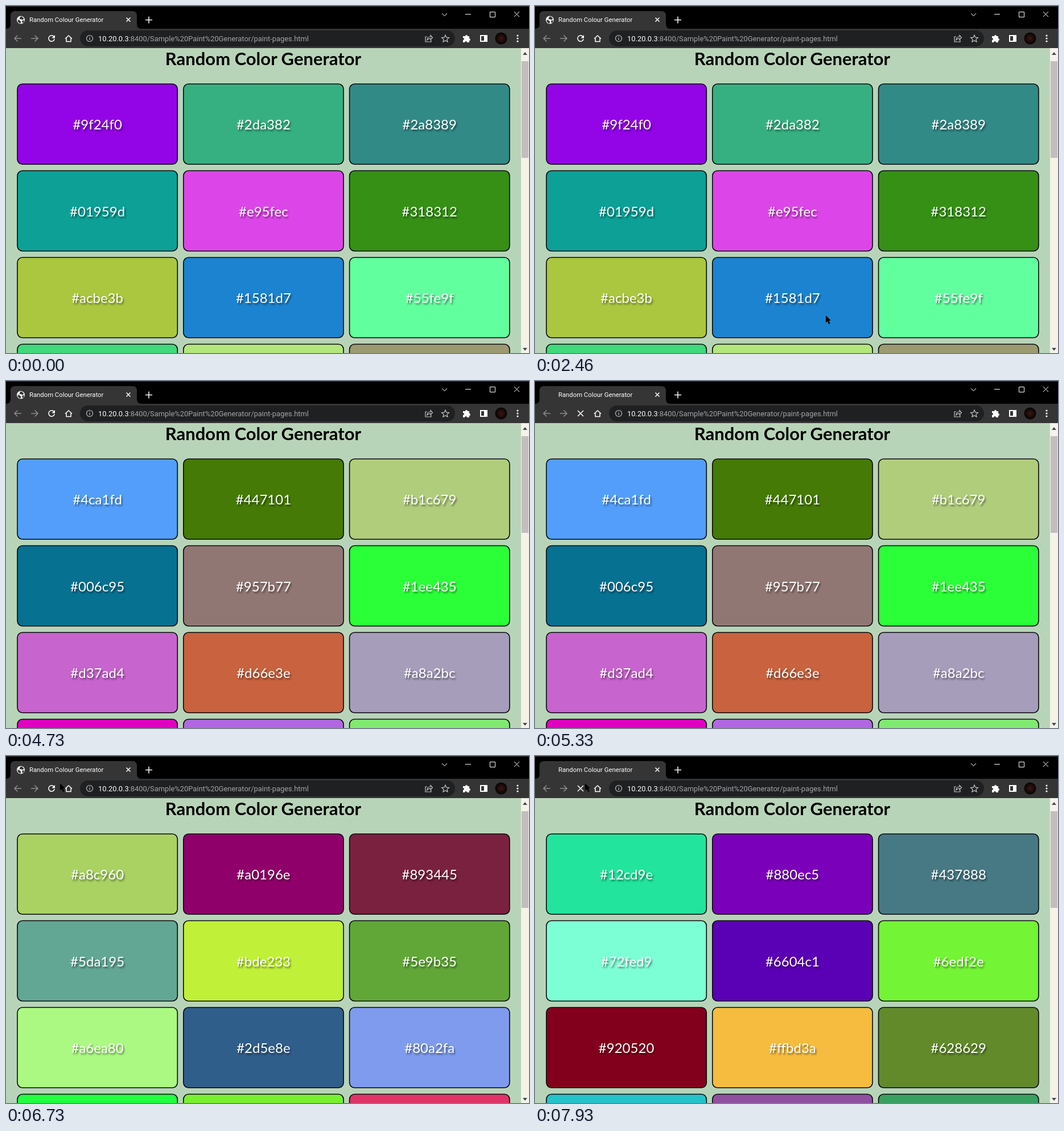
Write an HTML page that moves like this. It is 919x610 px and loops after 8000 ms.

```html
<!DOCTYPE html>
<html lang="en">
<head>
<meta charset="utf-8">
<title>Random Colour Generator</title>
<style>
  html, body { margin: 0; width: 100%; height: 100%; overflow: hidden; background: #000; }
  svg { display: block; width: 919px; height: 610px; }
  .ui { font-family: Roboto, sans-serif; fill: #fff; }
  .line { fill: none; stroke: #fff; stroke-width: 1.5; }
  .thin { fill: none; stroke: #fff; stroke-width: 1; }
  .dim { stroke: #8c8c8c; }
  .soft { stroke: #c4c4c4; stroke-width: 1.2; }
  .page { font-family: Lato, sans-serif; text-anchor: middle; }
  .title { font-size: 31px; font-weight: 700; }
  .code { font-size: 24px; fill: #fff; text-shadow: 2px 3px 3px rgba(0, 0, 0, .45); }
  .card { stroke: #08080c; stroke-width: 1.6; }
</style>
</head>
<body>
<svg viewBox="0 0 919 610">
  <defs>
    <radialGradient id="avatar">
      <stop offset="0" stop-color="#3c1710"/>
      <stop offset="1" stop-color="#060304"/>
    </radialGradient>
  </defs>

  <!-- page -->
  <rect y="74" width="905" height="536" fill="#b8d4b8"/>
  <text class="page title" x="452" y="104">Random Color Generator</text>
  <g id="cards"></g>
  <rect x="905" y="74" width="14" height="536" fill="#f5f2e8"/>
  <rect x="906" y="97" width="12" height="170" fill="#c2bebc"/>
  <path d="M908 86l4-5 4 5zM908 601h8l-4 5z" fill="#4a4a4a"/>

  <!-- tab strip -->
  <rect width="919" height="74" fill="#000"/>
  <path d="M0 .5H919" stroke="#3a3a40"/>
  <path d="M0 40q8 0 8-8V17q0-8 8-8H222q8 0 8 8V32q0 8 8 8H919V74H0z" fill="#353535"/>
  <g id="globe">
    <circle cx="26" cy="24.500" r="7" fill="#f4f4f4"/>
    <path d="M20.500 24l4 1.500 2 2.500-1.500 3-4-3zM25 19l3-.5 3.500 4-3 2-2-1.500-3 .5zM28 26l4-1-1 4-2 1z" fill="#353535"/>
  </g>
  <text class="ui" x="41" y="28" font-size="11.3">Random Colour Generator</text>
  <path class="line" d="M211.500 20.500l7 7m0-7l-7 7M245 24.500h12m-6-6v12"/>
  <path class="thin" d="M766 13l4.500 4.500 4.500-4.500M807 14.500h10M850.500 10.500h9v9h-9zM893 10l9 9m0-9l-9 9"/>

  <!-- toolbar -->
  <rect x="130" y="43" width="659" height="28" rx="14" fill="#1f2022"/>
  <path class="line dim" d="M27 57H15m5.500-5.500L15 57l5.500 5.500M44 57h12m-5.500-5.500L56 57l-5.500 5.500"/>
  <g id="reload">
    <path class="line" stroke-width="1.8" d="M84 53.500a5.200 5.200 0 1 0 1.200 4.500"/>
    <path d="M86 51v5.500h-5.500z" fill="#fff"/>
  </g>
  <path id="stop" class="line" d="M75 52l10 10m0-10L75 62"/>
  <path class="line" d="M104 57.500l6-5.500 6 5.500M106 56.500v6h8v-6"/>
  <g class="soft" fill="none">
    <circle cx="147" cy="57" r="5.500"/>
    <path d="M147 56v4m0-6.500v1.300"/>
    <path d="M740 54h-3v9h10v-3M740 60q0-6 6-6v-2.500l3.500 4-3.500 4V57q-4 0-6 3z"/>
    <path d="M772 51l1.800 4.200 4.600.4-3.500 3 1.100 4.500-4-2.400-4 2.400 1.100-4.500-3.500-3 4.600-.4z"/>
  </g>
  <text class="ui" x="162" y="61.500" font-size="12.9">10.20.0.3<tspan fill="#a2a5a8">:8400/Sample%20Paint%20Generator/paint-pages.html</tspan></text>
  <path fill="#fff" d="M803 53h4a2 2 0 0 1 4 0h3v4a2 2 0 0 1 0 4v3h-4a2 2 0 0 0-4 0h-3v-4a2 2 0 0 0 0-4z"/>
  <path fill="#fff" fill-rule="evenodd" d="M833 51h13v12h-13zM835 53v8h5v-8z"/>
  <circle cx="870" cy="57" r="10.500" fill="url(#avatar)"/>
  <g fill="#fff"><circle cx="899" cy="52" r="1.600"/><circle cx="899" cy="57" r="1.600"/><circle cx="899" cy="62" r="1.600"/></g>

  <path id="cursor" d="M0 0V13l3-3 2.300 5.300 2.200-1L5.300 9H9z"/>
</svg>
<script>
const LOOP = 8000;

// Each palette: nine "label fill" pairs, then the fills of the cut-off bottom row.
const palettes = [
  `9f24f0 9305e6 2da382 37b081 2a8389 328a87 01959d 0ca097 e95fec dc46e8 318312 359015
   acbe3b abc73f 1581d7 1c83d0 55fe9f 62ff9f 40d97c b3e77c 9c9a70`,
  `4ca1fd 529efa 447101 457a06 b1c679 b0cd7c 006c95 077192 957b77 917773 1ee435 2bff38
   d37ad4 c864ce d66e3e c9623e a8a2bc a69dba e000c0 b067e0 80ea70`,
  `d3c6ae cdc1ab 1f234b 1f1f45 147c93 1b828e 1298d3 1e9dcf 08c77f 17df7e 449cf7 4a9af0
   53391e 4f341d 3e888c 458b87 193cd1 1b2cca 207c62 d13238 b846e0`,
  `a8c960 a9d263 a0196e 90006a 893445 7b2140 5da195 62a794 bde233 c0f037 5e9b35 61a737
   a6ea80 abf982 2d5e8e 305e8b 80a2fa 7f9bee 22ff40 78f030 e03468`,
  `12cd9e 22e49c 880ec5 7b00b9 437888 477984 72fed9 7dffd5 6604c1 5a00b5 6edf2e 73f434
   920520 83001c ffbd3a f5bc3f 628629 628a2b 25c2ca 9050a0 38a060`
].map(text => text.split(/\s+/));

// Page reloads: [start, end]; new colours appear at the end.
const reloads = [[4350, 4600], [5180, 5420], [5960, 6180], [6960, 7200], [7860, LOOP]];

// Pointer stops: [time, x, y]
const stops = [
  [1850, 560, 612], [2300, 511, 544], [3560, 511, 544], [4200, 292, 10], [4700, 292, 10],
  [5200, 292, 17], [5850, 114, 38], [6050, 114, 38], [6600, 95, 48], [7000, 95, 48], [7500, 88, 48]
];

const byId = id => document.getElementById(id);

function add(parent, tag, attributes) {
  const node = document.createElementNS(parent.namespaceURI, tag);
  for (const name in attributes) node.setAttribute(name, attributes[name]);
  return parent.appendChild(node);
}

const cards = Array.from({ length: 12 }, (_, i) => {
  const x = 20 + (i % 3) * 291.8;
  const y = 137 + Math.floor(i / 3) * 152.5;
  const box = add(byId('cards'), 'rect', { class: 'card', x, y, width: 281.3, height: 141.3, rx: 9 });
  const label = i < 9 && add(byId('cards'), 'text', { class: 'page code', x: x + 140.6, y: y + 80 });
  return { box, label };
});

function paint(palette) {
  cards.forEach(({ box, label }, i) => {
    box.setAttribute('fill', '#' + palette[label ? 2 * i + 1 : 9 + i]);
    if (label) label.textContent = '#' + palette[2 * i];
  });
}

function pointerAt(time) {
  const next = stops.findIndex(stop => stop[0] > time);
  if (next === 0) return stops[0].slice(1);
  if (next < 0) return stops.at(-1).slice(1);
  const [t0, x0, y0] = stops[next - 1];
  const [t1, x1, y1] = stops[next];
  const u = (time - t0) / (t1 - t0);
  const eased = u * u * (3 - 2 * u);
  return [x0 + (x1 - x0) * eased, y0 + (y1 - y0) * eased];
}

let shown = -1;

function draw(now) {
  const time = now % LOOP;
  const index = reloads.filter(([, end]) => time >= end).length;
  if (index !== shown) paint(palettes[shown = index]);

  const loading = reloads.some(([start, end]) => time >= start && time < end);
  byId('globe').style.display = byId('reload').style.display = loading ? 'none' : '';
  byId('stop').style.display = loading ? '' : 'none';
  byId('cursor').setAttribute('transform', `translate(${pointerAt(time)})`);
}

const begin = performance.now();
function tick() {
  draw(performance.now() - begin);
  requestAnimationFrame(tick);
}
tick();
</script>
</body>
</html>
```
